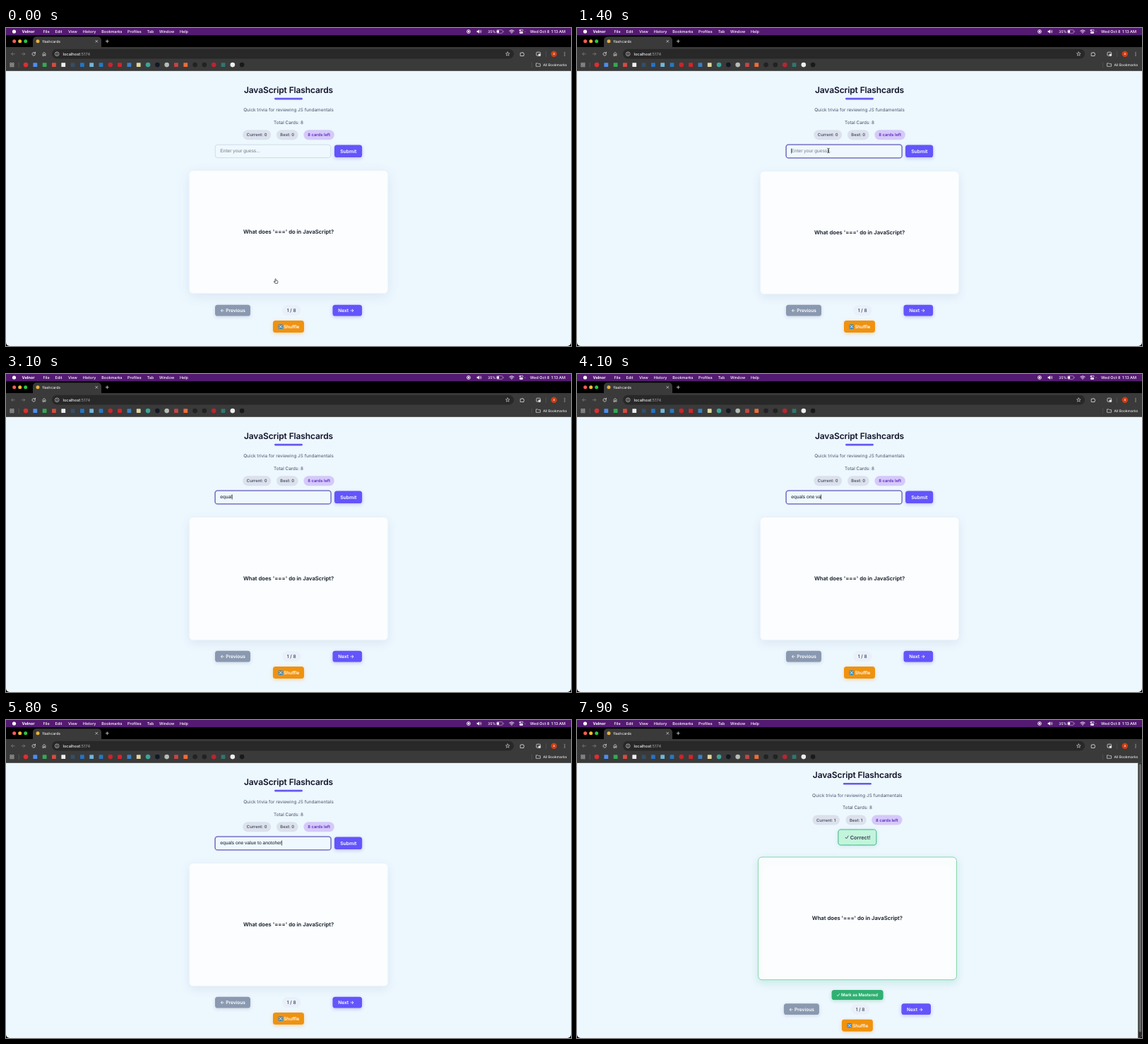
These frames come from a looping animation (800x450 px, 8000 ms). An HTML page with a canvas:

```html
<!DOCTYPE html>
<html lang="en">
<head>
<meta charset="utf-8">
<title>Flashcards</title>
<style>
html, body { margin: 0; width: 100%; height: 100%; overflow: hidden; background: #000; }
canvas { display: block; width: 800px; height: 450px; }
</style>
</head>
<body>
<canvas id="stage"></canvas>
<script>
const LOOP = 8000, CLICK = 1200, TYPE = 2500, TYPED = 5750, SUBMIT = 6500;
const ANSWER = 'equals one value to anotoher';
const INTER = 'Inter, sans-serif', ARIAL = '"Liberation Sans", Arial, sans-serif';
const stage = document.getElementById('stage'), c = stage.getContext('2d');
const dpr = window.devicePixelRatio || 1;
stage.width = 800 * dpr;
stage.height = 450 * dpr;
c.textRendering = 'geometricPrecision';

function box(x, y, w, h, r, fill, stroke, lw = 1) {
  c.beginPath();
  c.roundRect(x, y, w, h, r);
  if (fill) { c.fillStyle = fill; c.fill(); }
  if (stroke) { c.strokeStyle = stroke; c.lineWidth = lw; c.stroke(); }
}
function shadowBox(blur, dy, color, ...args) {
  c.save();
  c.shadowColor = color;
  c.shadowBlur = blur * dpr;
  c.shadowOffsetY = dy * dpr;
  box(...args);
  c.restore();
}
function dot(x, y, r, fill, stroke, lw) {
  box(x - r, y - r, 2 * r, 2 * r, r, fill, stroke, lw);
}
// y is the vertical middle of the capitals
function text(str, x, y, size, weight, fill, align = 'left', family = INTER, spacing = 0) {
  c.font = `${weight} ${size}px ${family}`;
  c.letterSpacing = spacing + 'px';
  c.textAlign = align;
  c.fillStyle = fill;
  c.fillText(str, x, y + size * 0.364);
  return c.measureText(str).width;
}
function path(d, color, lw = 0.8, x = 0, y = 0, fill) {
  c.save();
  c.translate(x, y);
  c.lineCap = c.lineJoin = 'round';
  c.strokeStyle = color;
  c.lineWidth = lw;
  const p = new Path2D(d);
  if (fill) { c.fillStyle = fill; c.fill(p); }
  c.stroke(p);
  c.restore();
}

function menuBar() {
  box(0, 0, 800, 10.5, 0, '#541a72');
  dot(11.5, 5, 2.6, '#fff');
  text('Velnor', 22.5, 5, 5.7, 700, '#fff');
  const items = { File: 52.5, Edit: 69.5, View: 88, History: 108.7, Bookmarks: 135.3,
    Profiles: 172, Tab: 199.7, Window: 217, Help: 246 };
  for (const name in items) text(name, items[name], 5, 5.45, 500, '#fff');
  dot(655, 5, 2.4, null, '#fff', 0.9);
  dot(655, 5, 1.2, '#fff');
  path('M0 -1H1.3L3 -2.4V2.4L1.3 1H0Z', '#fff', 0.3, 667, 5, '#fff');
  path('M4.3 -1.2Q5.1 0 4.3 1.2M5.5 -2Q6.9 0 5.5 2', '#fff', 0.6, 667, 5);
  text('35%', 682.3, 5, 5, 500, '#fff');
  box(694.6, 2.7, 8.6, 4.6, 1.3, null, '#c9b3d4', 0.6);
  box(695.2, 3.3, 2.9, 3.4, 0.7, '#fff');
  box(703.9, 4.2, 0.7, 1.6, 0.3, '#c9b3d4');
  path('M-3.2 -1Q0 -3.6 3.2 -1M-1.9 .5Q0 -1.1 1.9 .5', '#fff', 0.9, 716, 5);
  dot(716, 7, 0.7, '#fff');
  box(726.8, 2.3, 5.4, 2.2, 1.1, null, '#fff', 0.6);
  box(726.8, 5.5, 5.4, 2.2, 1.1, '#fff');
  dot(728, 3.4, 0.8, '#fff');
  dot(735, 5, 0.6, '#f59e0b');
  text('Wed Oct 8', 742, 5, 5.5, 500, '#fff');
  text('1:13 AM', 792, 5, 5.5, 500, '#fff', 'right');
}

function browser() {
  box(0, 10.5, 800, 17, 0, '#000');
  ['#ff5f57', '#febc2e', '#28c840'].forEach((k, i) => dot(11.7 + i * 8, 18.7, 2.5, k));
  box(0, 27, 800, 33.5, 0, '#3a3a3a');
  box(38, 12.3, 97, 17, [5, 5, 0, 0], '#3a3a3a');
  dot(45, 18.7, 2.5, '#e5b13c');
  text('flashcards', 51.5, 18.8, 5.1, 500, '#e8e8e8');
  path('M-1.4 -1.4L1.4 1.4M1.4 -1.4L-1.4 1.4', '#ddd', 0.7, 128.3, 18.8);
  path('M-2 0H2M0 -2V2', '#ddd', 0.8, 143.3, 18.8);

  const arrow = 'M2.3 0H-2.3M-.3 -2L-2.3 0L-.3 2';
  path(arrow, '#858585', 0.7, 10, 36.7);
  path('M-2.3 0H2.3M.3 -2L2.3 0L.3 2', '#858585', 0.7, 24.5, 36.7);
  path('M1.9 -1.2A2.3 2.3 0 1 0 2.2 .8M2.2 -2.6V-.8H.4', '#ddd', 0.8, 39.3, 36.7);
  path('M-2 2.4V-.5L0 -2.3L2 -.5V2.4H.7V.6H-.7V2.4Z', '#ddd', 0.7, 54, 36.7);
  box(65, 29.8, 654, 13.8, 6.9, '#282828');
  dot(72.2, 36.7, 2.8, null, '#ddd', 0.7);
  path('M0 -.2V1.3M0 -1.3V-1.25', '#ddd', 0.7, 72.2, 36.7);
  const w = text('localhost', 80.5, 36.7, 5.7, 500, '#eee');
  text(':5174', 80.5 + w, 36.7, 5.7, 400, '#aaa');
  path('M0 -2.8L.8 -.9L2.8 -.8L1.2 .5L1.8 2.5L0 1.4L-1.8 2.5L-1.2 .5L-2.8 -.8L-.8 -.9Z', '#ddd', 0.6, 710.3, 36.7);
  path('M-2.4 -1.8H-.7Q0 -4 .7 -1.8H2V-.3Q4 .3 2 1V2.5H-2.4Z', '#ddd', 0.8, 731, 37);
  box(751, 34.2, 5.6, 5, 1, null, '#ddd', 0.8);
  box(753.7, 36.5, 3.4, 3.2, 0.7, '#ddd');
  box(764, 33, 0.6, 8, 0, '#5a5a5a');
  dot(775.8, 36.7, 4.2, '#cf3d12');
  text('A', 775.8, 36.7, 4, 500, '#fff', 'center');
  [-2.2, 0, 2.2].forEach(d => dot(791, 36.7 + d, 0.6, '#ddd'));

  for (let i = 0; i < 4; i++)
    box(5.8 + (i % 2) * 3.1, 49.5 + (i >> 1) * 3.1, 2.2, 2.2, 0.3, null, '#ddd', 0.6);
  box(17.8, 48.5, 0.7, 7.5, 0, '#5c5c5c');
  const marks = ['#e02d2d', '#4b8df0', '#34a853', '#d94a3d', '#eee', '#334e68', '#2373c7', '#6fb4dc',
    '#2478c5', '#c8242c', '#d8232a', '#397fc4', '#e0d6a0', '#3aa59a', '#111827', '#b6bdb8', '#c44545',
    '#f26b36', '#222', '#222', '#b92530', '#30766c', '#eee', '#191919'];
  const round = [0, 9, 13, 14, 15, 18, 19, 20, 22, 23];
  marks.forEach((k, i) => {
    const x = 28 + i * 13.31;
    if (round.includes(i)) dot(x, 52.1, 3.3, k);
    else box(x - 2.9, 49.2, 5.8, 5.8, 0.6, k);
  });
  box(744.2, 48.5, 0.6, 7.5, 0, '#5c5c5c');
  path('M-2.8 -2.1H-.7L.1 -1.3H2.8V2.3H-2.8Z', '#ddd', 0.7, 753.7, 52);
  text('All Bookmarks', 760.5, 52, 4.9, 500, '#e6e6e6');
}

function pill(label, x, w, y, fill, color) {
  box(x, y - 7, w, 14, 7, fill);
  text(label, x + w / 2, y, 5.85, 600, color, 'center');
}
function button(label, x, y, w, h, fill, size, tx) {
  shadowBox(5, 1.5, fill + '55', x, y, w, h, 3.6, fill);
  text(label, tx, y + h / 2, size, 600, '#fff');
}
function shuffle(x, y) {
  button('Shuffle', x, y, 44, 17, '#f0920f', 6.4, x + 15.2);
  box(x + 7.5, y + 5.3, 6.6, 6.6, 1, '#3d83b5');
  path('M-2.2 -1.5H-1L1 1.5H2.2M-2.2 1.5H-1L1 -1.5H2.2', '#fff', 0.7, x + 10.8, y + 8.6);
}

function input(t) {
  const focus = t >= CLICK, n = typedCount(t);
  if (focus) {
    box(294.8, 163.8, 166.6, 21.4, 4.5, '#dcdffb');
    box(296.1, 165.1, 164, 18.8, 3.5, '#eff8fe', '#6461b8', 1.3);
  } else box(296.2, 165.2, 163.6, 18.4, 3.5, '#eff8fe', '#ccd8e4', 0.9);
  const value = ANSWER.slice(0, n);
  const w = text(value || 'Enter your guess...', 303.3, 174, 6.74, 400, n ? '#111827' : '#757b83', 'left', ARIAL);
  const since = t < TYPE ? t - CLICK : Math.max(0, t - TYPED);
  if (focus && since % 1000 < 500) box(303.3 + (n ? w : 0.1), 170.4, 0.7, 7.2, 0, '#111');
}
function typedCount(t) {
  if (t < TYPE) return 0;
  return Math.min(ANSWER.length, Math.floor(t < 4100 ? 5.05 + (t - 3100) / 125 : 13.05 + (t - 4100) / 110));
}

function page(t, lift) {
  const done = t >= SUBMIT, score = done ? 1 : 0;
  box(0, 60.5, 800, 389.5, [0, 0, 5, 5], '#edf7fe');
  c.save();
  if (done) c.translate(-3.1, 0);

  // header
  c.save();
  if (done) c.translate(0, -9.8);
  text('JavaScript Flashcards', 400, 87.6, 12, 600, '#111329', 'center', INTER, -0.12);
  box(380, 98.8, 40, 2.6, 1.3, '#6657ee');
  text('Quick trivia for reviewing JS fundamentals', 400, 116, 6.4, 400, '#475569', 'center');
  text('Total Cards: 8', 400, 133.4, 6.4, 400, '#3f4b5f', 'center');
  const d = done ? 1.2 : 0;
  pill('Current: ' + score, 335.3 + d, 39.8 - d, 151.3, '#dce1ec', '#475569');
  pill('Best: ' + score, 383 + d / 2, 30.5 - d, 151.3, '#dce1ec', '#475569');
  pill('8 cards left', 421.5 - d, 43.3, 151.3, '#d5c9f9', '#5b28c4');
  c.restore();

  if (done) {
    shadowBox(6, 1, '#10b98133', 373, 155, 54, 22, 3.5, '#c3f4dc');
    c.setLineDash([1.6, 0.5]);
    box(373, 155, 54, 22, 3.5, null, '#17a268', 1);
    c.setLineDash([]);
    path('M-2 .2L-.6 1.9L2 -2', '#334155', 0.9, 385.2, 166);
    text('Correct!', 389.8, 166, 7.3, 600, '#334155');
  } else {
    input(t);
    button('Submit', 465, 165.5, 39.2, 17.5, '#6355fa', 6.8, 473.2);
  }

  // card
  const y = done ? 194 : 203 - lift;
  shadowBox(done ? 12 : 14 + 4 * lift, 4, done ? '#10b9812e' : '#33628f1c', 259.6, y, 281, 173.6, 5.5,
    '#fbfdfe', done ? '#7ed0a4' : null, 0.9);
  text("What does '===' do in JavaScript?", 400, y + 86.6, 7.7, 600, '#111827', 'center');

  // navigation
  if (done) {
    shadowBox(5, 1.5, '#30b07055', 363.7, 382, 73, 14, 3.6, '#30b072');
    path('M-1.6 .2L-.5 1.5L1.6 -1.6', '#fff', 0.8, 373, 389.2);
    text('Mark as Mastered', 377, 389.2, 6, 600, '#fff');
  }
  const n = done ? 401.3 : 391.7;
  button('← Previous', 296, n, 50, 15.8, '#8a99b0', 6.6, 303.2);
  box(391, n + 0.4, 26.5, 15, 7.5, '#e9f0fa');
  text('1 / 8', 404.2, n + 8, 6.6, 500, '#334155', 'center');
  button('Next →', 462.5, n, 41.6, 15.8, '#6355fa', 6.6, 470.2);
  shuffle(378, n + 22.4);
  c.restore();

  if (done) {
    box(794.3, 60.5, 5.7, 389.5, [0, 0, 5, 0], '#2d2d2d');
    box(795.7, 62, 3.2, 379.5, 1.6, '#6c6c6c');
  }
}

function mouseAt(t) {
  const p = Math.min(1, Math.max(0, (t - 250) / 850)), e = p * p * (3 - 2 * p);
  return [382 - 26 * e, 358 - 184.5 * e];
}
function pointer([x, y]) {
  if (y > 202)
    path('M-1 .9V-2.6Q-.3 -3.8 .3 -2.6V-.7L2.5 -.1Q3.2 .2 3 1.1L2.4 3.4H-.8L-2.8 .9Q-2.6 -.1 -1 .9Z',
      '#222', 0.7, x, y, '#fff');
  else if (y > 184)
    path('M0 0V7L1.7 5.5L2.9 8L4 7.5L2.9 5.1H5Z', '#fff', 0.6, x, y, '#000');
  else
    path('M-1.3 -3.2Q0 -3.2 0 -2.3V2.3Q0 3.2 -1.3 3.2M1.3 -3.2Q0 -3.2 0 -2.3V2.3Q0 3.2 1.3 3.2M-.8 .5H.8',
      '#222', 0.7, x, y);
}

function draw(now) {
  const t = now % LOOP, mouse = mouseAt(t);
  c.setTransform(dpr, 0, 0, dpr, 0, 0);
  box(0, 0, 800, 450, 0, '#000');
  page(t, mouse[1] > 202 ? 1 : 0);
  menuBar();
  browser();
  if (t < TYPE) pointer(mouse);
  requestAnimationFrame(draw);
}
requestAnimationFrame(draw);
</script>
</body>
</html>
```
